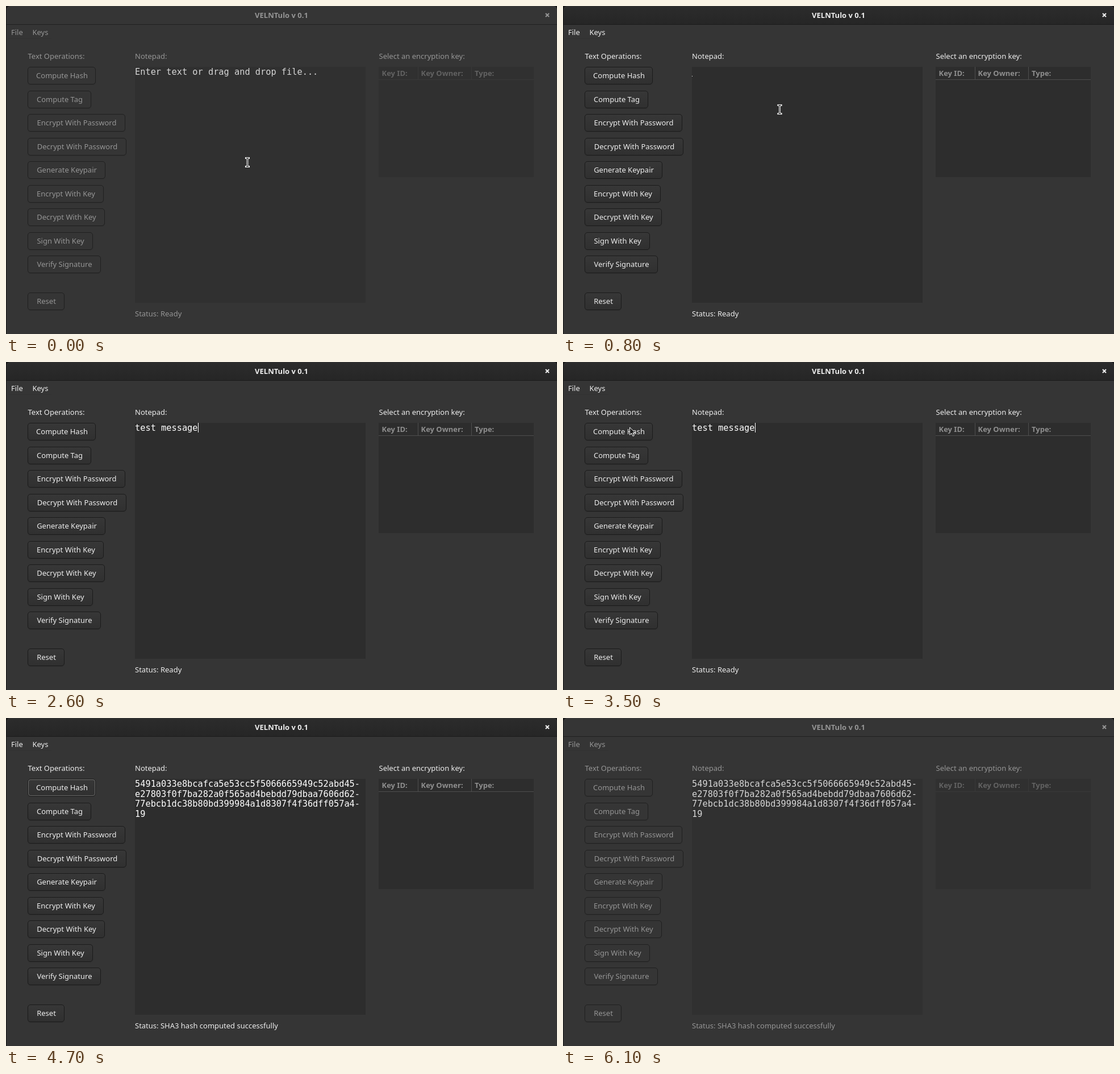
Animation, 970 px wide and 577 px high, one loop 6.2 s. Source, as an HTML page:

```html
<!DOCTYPE html>
<html lang="en">
<head>
<meta charset="utf-8">
<title>Text tool</title>
<style>
  html, body { margin: 0; width: 100%; height: 100%; overflow: hidden; background: #191919; }
  #stage { position: absolute; left: 0; top: 0; width: 970px; height: 577px; overflow: hidden;
    font: 13px/18px "Noto Sans", "Open Sans", sans-serif; color: var(--fg); white-space: pre; }
  #stage * { position: absolute; box-sizing: border-box; }
  .window { left: 1px; top: 0; width: 969px; height: 577px; background: #353535; border-radius: 7px 7px 0 0; }
  .header { left: 1px; top: 0; width: 969px; height: 33px; border-radius: 7px 7px 0 0;
    background: linear-gradient(var(--headTop), var(--headBottom));
    border-bottom: 1px solid var(--edge); box-shadow: inset 0 1px #ffffff0a; }
  .title { left: 0; width: 970px; top: 7px; text-align: center; font-weight: 700; }
  .menuline { left: 5px; top: 57px; width: 75px; height: 1px; background: #313131; }
  .button { left: 38px; height: 31px; border: 1px solid var(--edge); border-radius: 5px; text-align: center;
    line-height: 29px; text-indent: 1px; background: linear-gradient(var(--btnTop), var(--btnBottom));
    box-shadow: 0 1px 1px #00000014; }
  .pressed { background: #252525; }
  .releasing { background: #2f2f2f; }
  .focused::after { content: ""; position: absolute; inset: 0; border: 1px solid #eeeeec4d; border-radius: 4px; }
  .view { top: 107px; background: var(--base); }
  .line { background: var(--grid); }
  .column { font-weight: 700; color: var(--column); }
  #note { left: 227px; top: 108px; font: 15.3px/17.5px "DejaVu Sans Mono", monospace; color: var(--text); }
  #caret { width: 1px; background: #fff; }
  svg { overflow: visible; fill: none; }
  .pointer { left: 0; top: 0; width: 1px; height: 1px; }
</style>
</head>
<body>
<div id="stage">
  <div class="window"></div>
  <div class="header"></div>
  <div class="title">VELNTulo v 0.1</div>
  <svg style="left:953px;top:16px" width="1" height="1"><path d="M-3-3L3 3M3-3L-3 3" style="stroke:var(--fg)" stroke-width="2.1"/></svg>
  <div class="menuline"></div>
  <div class="view" style="left:227px;width:406px;height:415px"></div>
  <div class="view" style="left:656px;width:273px;height:194px"></div>
  <div class="line" style="left:656px;top:129px;width:273px;height:1px"></div>
  <div class="line" style="left:725px;top:107px;width:1px;height:22px"></div>
  <div class="line" style="left:819px;top:107px;width:1px;height:22px"></div>
  <div id="note"></div>
  <div id="caret"></div>
</div>
<script>
const LOOP = 6200, STEP = 100;
const stage = document.getElementById('stage');
const note = document.getElementById('note');
const caret = document.getElementById('caret');

function add(text, x, y, className = '') {
  const el = document.createElement('div');
  el.textContent = text;
  el.className = className;
  el.style.left = x + 'px';
  el.style.top = y + 'px';
  stage.append(el);
  return el;
}

add('File', 9, 37);
add('Keys', 46.5, 37);
add('Text Operations:', 38.5, 79);
add('Notepad:', 227, 79);
add('Select an encryption key:', 656.5, 79);
add('Key ID:', 661.5, 109, 'column');
add('Key Owner:', 730.5, 109, 'column');
add('Type:', 825, 109, 'column');
const status = add('', 227, 532);

const buttons = [
  ['Compute Hash', 120], ['Compute Tag', 112], ['Encrypt With Password', 172],
  ['Decrypt With Password', 174], ['Generate Keypair', 137], ['Encrypt With Key', 134],
  ['Decrypt With Key', 136], ['Sign With Key', 115], ['Verify Signature', 129], ['Reset', 65]
].map(([text, width], i) => {
  const el = add(text, 38, text === 'Reset' ? 504 : Math.round(107 + i * 41.5), 'button');
  el.style.width = width + 'px';
  return el;
});

stage.insertAdjacentHTML('beforeend', `
  <svg id="beam" class="pointer">
    <path d="M-2.5-7.5H2.5M0-7.5V7.5M-2.5 7.5H2.5" stroke="#fff" stroke-width="3" stroke-linecap="square"/>
    <path d="M-2.5-7.5H2.5M0-7.5V7.5M-2.5 7.5H2.5" stroke="#1c1c1c" stroke-width="1.1"/>
  </svg>
  <svg id="arrow" class="pointer">
    <path d="M.5 .9V14.2L3.7 11.3 6 16.4 8.3 15.4 6 10.5H10Z" fill="#1c1c1c" stroke="#fff"/>
  </svg>`);
const beam = document.getElementById('beam');
const arrow = document.getElementById('arrow');

// Grey levels: [window in background, window focused]
const palette = {
  fg: [149, 238], text: [214, 255], base: [48, 45], edge: [32, 27],
  headTop: [53, 44], headBottom: [53, 38], btnTop: [53, 55], btnBottom: [53, 48],
  grid: [57, 78], column: [98, 142]
};
const focus = [[0, 0], [400, .35], [500, .8], [600, 1], [6000, .35], [6100, 0]];
const typed = [[400, 0], [1200, 1], [1300, 2], [1400, 3], [1600, 4], [1700, 5], [1900, 6],
  [2000, 7], [2200, 8], [2300, 9], [2400, 10], [2600, 12]];
const pointer = [
  [0, beam, 425, 275], [100, beam, 402, 226], [200, beam, 381.5, 182], [1200],
  [3000, beam, 249.5, 167], [3100, arrow, 214, 149], [3200, arrow, 178, 134],
  [3300, arrow, 147, 122], [3400, arrow, 126, 116], [3500, arrow, 117, 114], [3600, arrow, 112.5, 121.5],
  [4200, arrow, 119, 118], [4300, arrow, 109, 94], [4400, arrow, 88, 64],
  [4500, arrow, 64, 34], [4600, arrow, 41, 7], [4700]
];
const hash = ['5491a033e8bcafca5e53cc5f5066665949c52abd45-', 'e27803f0f7ba282a0f565ad4bebdd79dbaa7606d62-',
  '77ebcb1dc38b80bd399984a1d8307f4f36dff057a4-', '19'].join('\n');

const latest = (track, t) => track.filter(key => key[0] <= t).pop();

function drawCaret(t, count) {
  const dot = t >= 800 && t < 1200;
  caret.style.display = t >= 400 && t < 3700 ? 'block' : 'none';
  caret.style.left = 227 + Math.round(count * 9.21) + 'px';
  caret.style.top = (dot ? 123 : 107) + 'px';
  caret.style.height = (dot ? 1 : 17) + 'px';
}

function render(t) {
  const level = latest(focus, t)[1];
  for (const [name, [off, on]] of Object.entries(palette)) {
    const v = Math.round(off + (on - off) * level);
    stage.style.setProperty('--' + name, `rgb(${v},${v},${v})`);
  }

  const count = t < 400 ? 0 : latest(typed, t)[1];
  const hashed = t >= 3800;
  note.textContent = t < 400 ? 'Enter text or drag and drop file...' : hashed ? hash : 'test message'.slice(0, count);
  status.textContent = 'Status: ' + (hashed ? 'SHA3 hash computed successfully' : 'Ready');
  drawCaret(t, count);

  const press = t === 3700 ? ' pressed' : t === 3800 ? ' releasing' : '';
  buttons[0].className = 'button' + press + (t >= 3700 && t < 6000 ? ' focused' : '');

  const [, shape, x, y] = latest(pointer, t);
  for (const el of [beam, arrow]) el.style.display = el === shape ? 'block' : 'none';
  if (shape) shape.style.transform = `translate(${x}px,${y}px)`;
}

function tick() {
  render(Math.floor(performance.now() % LOOP / STEP) * STEP);
  requestAnimationFrame(tick);
}
tick();
</script>
</body>
</html>
```
